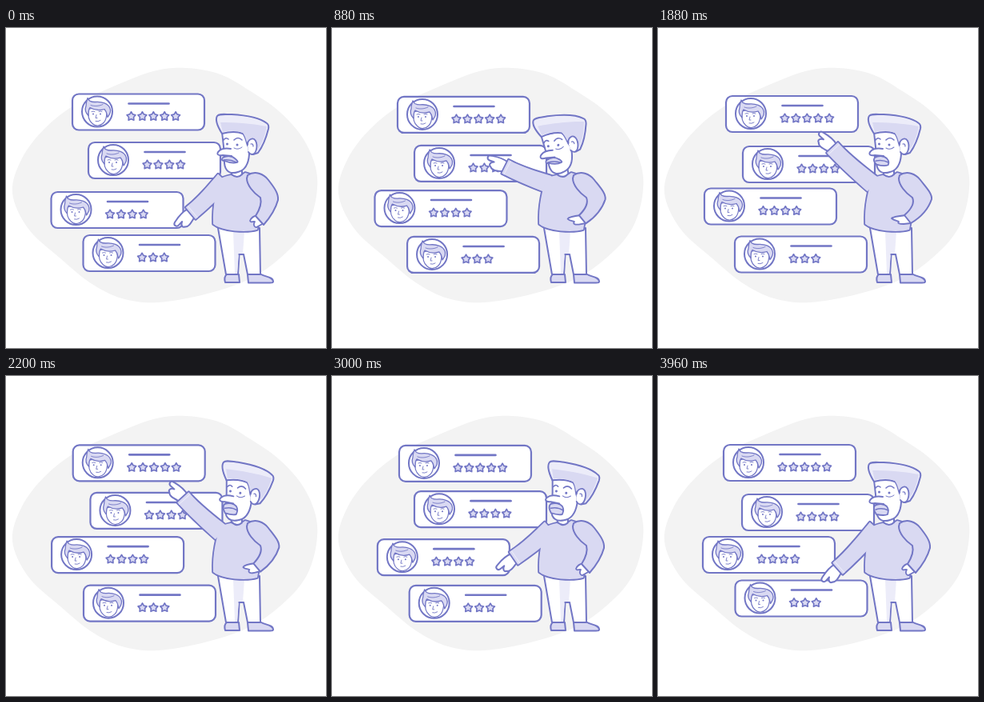
Animation, 400 px wide and 400 px high, one loop 4000 ms. Source, as an HTML page with a canvas:

```html
<!DOCTYPE html>
<html lang="en">
<head>
<meta charset="utf-8">
<title>Reviews</title>
<style>
html, body { margin: 0; width: 100%; height: 100%; overflow: hidden; background: #fff; }
canvas { display: block; width: 400px; height: 400px; }
</style>
</head>
<body>
<canvas id="stage"></canvas>
<script>
const LOOP = 4000, STEP = 40;
const LINE = '#7276c5', TINT = '#d9d9f2', PALE = '#ececf9', WHITE = '#fff';
const canvas = document.getElementById('stage');
const ctx = canvas.getContext('2d');
const dpr = window.devicePixelRatio || 1;
canvas.width = canvas.height = 400 * dpr;

const mix = (a, b, k) => a + (b - a) * k;

// Eased value between [time, value] keys
function ease(t, keys) {
  if (t <= keys[0][0]) return keys[0][1];
  for (let i = 1; i < keys.length; i++) {
    const [t0, a] = keys[i - 1], [t1, b] = keys[i];
    if (t <= t1) {
      const k = (t - t0) / (t1 - t0);
      return mix(a, b, k * k * (3 - 2 * k));
    }
  }
  return keys[keys.length - 1][1];
}

// Continuous drift through values at shared times
const TIMES = [0, 440, 860, 1280, 1880, 2520, 2960, 3400, 3960];
function drift(t, v) {
  const last = TIMES.length - 1;
  let i = 0;
  while (i < last - 1 && t > TIMES[i + 1]) i++;
  const slope = j => {
    const a = Math.max(j - 1, 0), b = Math.min(j + 1, last);
    return (v[b] - v[a]) / (TIMES[b] - TIMES[a]);
  };
  const d = TIMES[i + 1] - TIMES[i], k = (t - TIMES[i]) / d;
  const k2 = k * k, k3 = k2 * k;
  return v[i] * (2 * k3 - 3 * k2 + 1) + v[i + 1] * (3 * k2 - 2 * k3) +
    d * (slope(i) * (k3 - 2 * k2 + k) + slope(i + 1) * (k3 - k2));
}

function paint(path, fill, width = 2, color = LINE) {
  const p = typeof path === 'string' ? new Path2D(path) : path;
  if (fill) { ctx.fillStyle = fill; ctx.fill(p); }
  if (width) { ctx.lineWidth = width; ctx.strokeStyle = color; ctx.stroke(p); }
}

function disc(x, y, r, fill, width) {
  const p = new Path2D();
  p.arc(x, y, r, 0, Math.PI * 2);
  paint(p, fill, width);
}

function placed(x, y, angle, draw) {
  ctx.save();
  ctx.translate(x, y);
  ctx.rotate(angle * Math.PI / 180);
  draw();
  ctx.restore();
}

function closedCurve(pts) {
  const p = new Path2D(), n = pts.length;
  p.moveTo(...pts[0]);
  for (let i = 0; i < n; i++) {
    const [a, b, c, d] = [-1, 0, 1, 2].map(o => pts[(i + o + n) % n]);
    p.bezierCurveTo(b[0] + (c[0] - a[0]) / 6, b[1] + (c[1] - a[1]) / 6,
      c[0] - (d[0] - b[0]) / 6, c[1] - (d[1] - b[1]) / 6, c[0], c[1]);
  }
  p.closePath();
  return p;
}

const blob = closedCurve([
  [8, 206], [20, 163], [48, 126], [86, 96], [132, 74], [184, 54], [225, 50],
  [268, 58], [304, 78], [340, 103], [370, 136], [387, 174], [388, 210],
  [376, 249], [350, 281], [308, 312], [252, 332], [190, 343], [145, 338],
  [106, 319], [68, 288], [28, 251]
]);

function starPath(r) {
  const p = new Path2D();
  for (let i = 0; i < 10; i++) {
    const a = i * Math.PI / 5 - Math.PI / 2, q = i % 2 ? r * 0.56 : r;
    p.lineTo(Math.cos(a) * q, Math.sin(a) * q);
  }
  p.closePath();
  return p;
}
const star = starPath(5.7);

const cards = [
  { stars: 5, x: [83, 81, 82, 80, 85, 82, 84, 82, 82], y: [82.5, 84.5, 86, 83.5, 85, 87.5, 87, 86, 86] },
  { stars: 4, x: [103, 104, 103, 105, 106, 104.5, 103, 104, 105], y: [143, 146, 147, 145, 148, 143.5, 144, 146.5, 148] },
  { stars: 4, x: [56.5, 57, 53.5, 55.5, 58, 56, 57, 54, 56], y: [205, 203, 203, 205, 200.5, 202.5, 204, 205, 201] },
  { stars: 3, x: [96.5, 95, 94, 97, 96, 98, 97, 92.5, 96.5], y: [259, 260, 261, 258.5, 260.5, 262.5, 262, 259, 255.5] }
];

function avatar() {
  disc(0, 0, 19, WHITE, 2);
  paint('M-11-3C-12 5-11 11-6 15C-2 19 4 18 8 14C11 11 12 6 12 0L6-7Z', WHITE, 1.2);
  paint('M-12-17C-11-13-8-12-3-12C6-13 14-10 16-4C18 1 15 4 13 7C12 3 12 0 9-3C3-1-4-2-9-5C-11-3-11 1-11 5C-14 2-16-2-14-7C-14-11-13-14-12-17Z', TINT, 1.3);
  paint('M-8-8C-3-6 3-7 7-9', null, 0.9);
  disc(-5, 3, 1, LINE, 0);
  disc(4, 3, 1, LINE, 0);
  paint('M-7 0Q-5-1-3 0M2 0Q4-1 6 0M-1 4L-2 8L0 8M-2 12Q1 13 4 11', null, 0.9);
}

function card(c, t) {
  placed(drift(t, c.x), drift(t, c.y), 0, () => {
    const box = new Path2D();
    box.roundRect(0, 0, 165, 45, 8);
    paint(box, WHITE, 2.2);
    placed(31, 22, 0, avatar);
    paint('M70.5 12H120.5', null, 2.6);
    for (let i = 0; i < c.stars; i++) {
      placed(73.5 + 13.9 * i, 28, 0, () => paint(star, TINT, 1.7));
    }
  });
}

function legs() {
  paint('M265 250L275 308H290L291.5 283H297L302 308H318L317 250Z', WHITE);
  paint('M284 254L298 254L296 282H291L289 307H286Z', PALE, 0);
  paint('M291 283H297', null, 1.6);
  paint('M276 308H291L292 318H274Q272 311 276 308Z', TINT);
  paint('M302 308H319C324 311 334 311 334 317Q334 318.5 330 318.5H303Z', TINT);
}

function armAndTorso(angle, reach) {
  const cuff = reach - 23, r = reach;
  const sleeve = new Path2D(
    `M-4 8C14 7 ${cuff - 24} 5 ${cuff - 2} 8L${cuff} -11C${cuff - 18} -13 16 -14 -4 -14Z`);
  const torso = new Path2D(
    'M281 184C276 185 271 186 268 189C263 201 258 222 259 245C270 254 301 256 314 252L320 218L322 188L299 181Q290 188 281 184Z');
  const hand = new Path2D(
    `M${cuff - 2} 5C${cuff + 7} 8 ${r - 8} 6 ${r - 2} 5C${r + 2} 4 ${r + 1} -1 ${r - 3} -1L${r - 9} -1` +
    `C${r - 4} -3 ${r - 4} -7 ${r - 7} -8C${r - 10} -12 ${r - 16} -10 ${cuff - 2} -8Z`);
  const inArm = draw => placed(268, 191, angle, draw);

  // Thick lines first, then fills, so the seam stays hidden
  inArm(() => { paint(hand, WHITE); paint(sleeve, null, 3.6); });
  paint(torso, null, 3.6);
  inArm(() => {
    paint(sleeve, TINT, 0);
    paint(`M${cuff - 5} 7L${cuff - 3} -11`, null, 1, PALE);
  });
  paint(torso, TINT, 0);
}

function hipArm(h) {
  const p = (x, y, dx, dy) => `${x + dx * h} ${y + dy * h} `;
  paint('M' + p(315, 234, -5, 0) + 'C' + p(309, 235, -8, 0) + p(306, 238, -13, -2) + p(305, 241, -13, -3) +
    'C' + p(306, 244, -11, -3) + p(309, 241, -8, 0) + p(311, 242, -10, 0) +
    'C' + p(308, 247, -9, -3) + p(312, 251, -11, -6) + p(315, 248, -8, -3) + 'L' + p(322, 244, -6, 0) + 'Z', WHITE, 1.8);
  paint('M302 184C311 178 322 182 328 190C335 199 ' + p(341, 207, 2, 0) + p(340, 215, 2, -1) +
    'C' + p(337, 226, 1, 0) + p(330, 237, -2, 0) + p(322, 246, -6, -2) +
    'L' + p(312, 235, -4, -1) + 'C' + p(317, 227, -1, 0) + p(320, 219, 1, 0) + '318 212C309 206 301 196 301 188Z', TINT);
}

function head(talk) {
  ctx.translate(-288, -180);
  paint('M282 174V183Q289 189 295 183V174Z', WHITE);
  paint('M270 130L272 148L273 169C274 180 281 183 290 180C298 178 303 172 304 158L302 130Z', WHITE);
  // Hair
  paint('M264 110C266 107 273 108 282 108C300 109 317 112 326 119Q329 121 328 126C325 138 321 148 315 156L309 158L302 147C300 142 300 136 296 132C288 129 278 130 270 132C265 124 261 115 264 110Z', PALE);
  paint('M268 118C285 118 306 119 326 123C323 138 319 147 313 154L306 140Q302 139 301 143Q299 135 296 131C288 128 279 128 271 130Z', TINT, 0);
  paint('M302 146C302 139 309 136 312 141C315 147 313 157 308 158Q305 158 303 155', WHITE, 1.8);
  paint('M306 145Q309 144 309 148', null, 1.2);
  // Eyes and brows
  disc(276.5, 145, 1.5, LINE, 0);
  disc(289, 146, 1.5, LINE, 0);
  paint('M272 140Q275 136 278 139M285 140Q290 135 295 140', null, 1.6);
  paint('M285 150Q290 153 295 149', null, 1);
  // Mouth, moustache and nose
  const low = mix(169, 174, talk), side = mix(289, 287, talk);
  paint(`M271 162C277 159 283 160 286 163Q${side + 2} 167 ${side} ${low - 1}Q283 ${low + 1} 273 ${mix(166, 173, talk)}Q268 166 271 162Z`, TINT, 1.8);
  paint(`M272 ${mix(165, 167, talk)}Q280 164 288 168`, null, 1.5);
  paint('M281 151C275 150 269 151 266 154C262 158 266 160 271 159L282 160', WHITE, 1.9);
}

function draw(t) {
  ctx.setTransform(dpr, 0, 0, dpr, 0, 0);
  ctx.lineJoin = ctx.lineCap = 'round';
  ctx.fillStyle = WHITE;
  ctx.fillRect(0, 0, 400, 400);
  paint(blob, '#f3f3f3', 0);
  cards.forEach(c => card(c, t));

  const tilt = ease(t, [[480, 0], [1040, -13], [1440, -13], [2160, 6.5], [2960, 6.5], [3480, 0]]);
  const angle = ease(t, [[480, 134], [1040, 217], [1280, 217], [1880, 221], [2560, 222], [3080, 134], [3400, 135.5], [3960, 132.5]]);
  const reach = ease(t, [[440, 79], [1280, 78], [1880, 89], [2520, 81], [3080, 79], [3400, 89], [3960, 90]]);
  const hip = ease(t, [[480, 0], [1040, 1], [1960, 1], [2520, 0.15], [2800, 0]]);
  const talk = Math.sqrt(Math.abs(Math.sin(t * Math.PI / 880)));

  legs();
  armAndTorso(angle, reach);
  hipArm(hip);
  placed(288, 180, tilt, () => head(talk));
}

const start = performance.now();
function tick() {
  const t = (performance.now() - start) % LOOP;
  draw(Math.floor(t / STEP) * STEP);
  requestAnimationFrame(tick);
}
tick();
</script>
</body>
</html>
```
